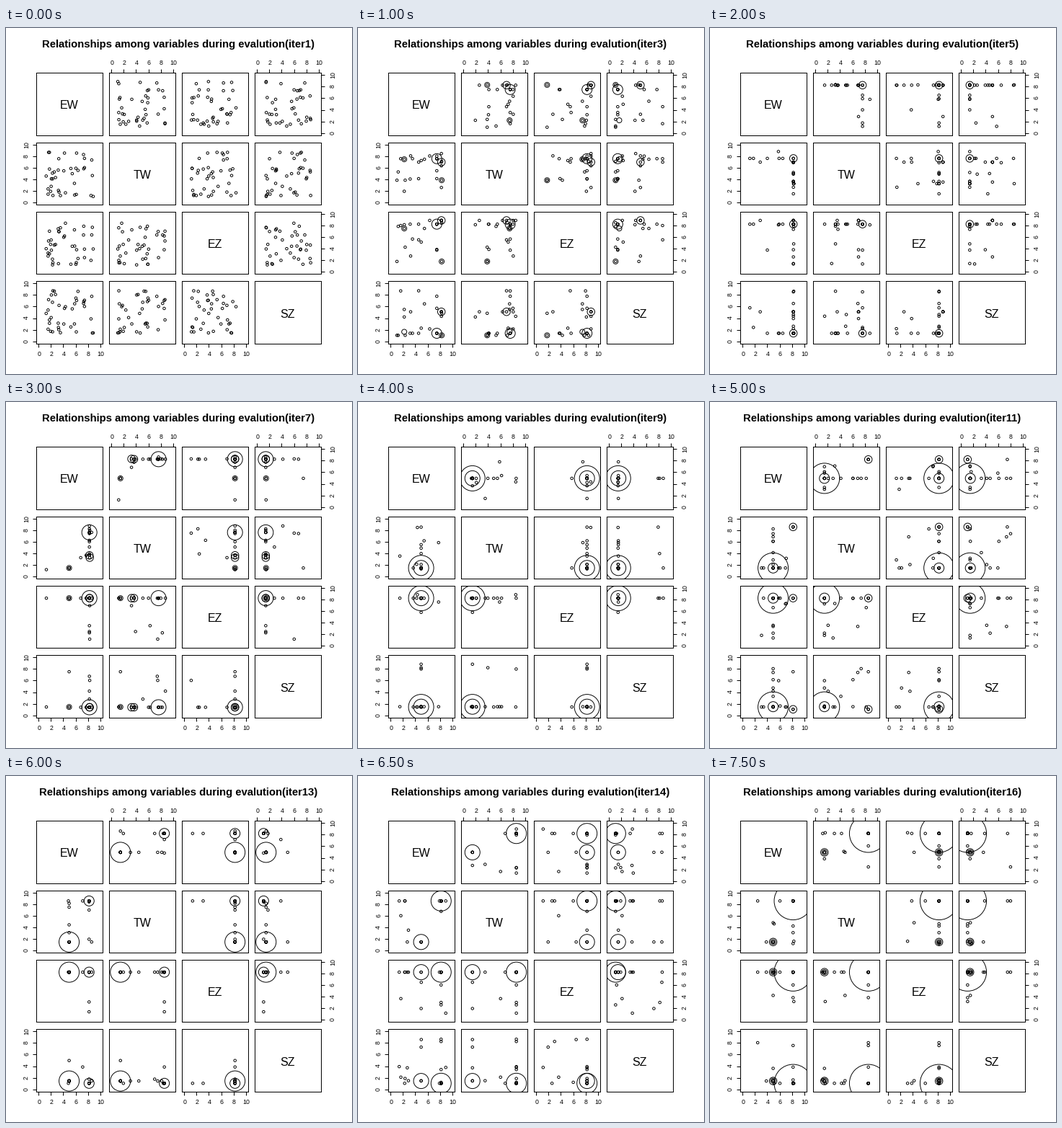
These frames come from a looping animation (480x480 px, 8000 ms). A matplotlib script:

```python
import matplotlib.pyplot as plt
import numpy as np
from matplotlib.animation import FuncAnimation

SIZE = 480
ITERATIONS = 16
NAMES = ["EW", "TW", "EZ", "SZ"]
LEFT = [42, 143, 244, 345]
TOP = [61, 158, 254, 350]
BOTTOM = [148, 244, 340, 437]
WIDTH = 92
LOW, HIGH = -0.4, 10.4
TICKS = range(0, 11, 2)
DOT = 3.5  # diameter of a single individual, in pixels

plt.rcParams["font.family"] = "Liberation Sans"

# Dominant individuals: their genes, and how many copies live at key iterations
LEADERS = [
    ((7.5, 7.6, 8.25, 1.4), {1: 0, 3: 4, 5: 0}),
    ((8.25, 7.0, 8.9, 5.1), {1: 0, 3: 3, 6: 0}),
    ((8.3, 3.85, 1.75, 1.05), {1: 0, 3: 2, 5: 0}),
    ((2.2, 7.5, 7.5, 1.65), {1: 0, 3: 2, 5: 0}),
    ((8.25, 7.65, 8.25, 1.4), {3: 0, 7: 6, 9: 0}),
    ((8.25, 3.65, 8.25, 1.4), {4: 0, 7: 3, 9: 0}),
    ((8.3, 3.25, 8.25, 1.4), {4: 0, 7: 3, 9: 0}),
    ((4.95, 1.45, 8.25, 1.45), {6: 0, 7: 2, 9: 10, 11: 12, 13: 8, 16: 3}),
    ((4.95, 1.45, 8.25, 1.5), {8: 0, 9: 6, 11: 4, 13: 1, 16: 2}),
    ((8.2, 8.6, 8.25, 1.05), {9: 0, 11: 3, 13: 4, 16: 15}),
]


def population(it):
    """Genes and copy counts: the leaders of this iteration plus mutants."""
    rng = np.random.default_rng(it)
    genes = np.array([g for g, _ in LEADERS])
    counts = np.array([np.interp(it, list(k), list(k.values()))
                       for _, k in LEADERS]).round()
    alive = counts > 0

    n = int(np.interp(it, [1, 3, 7], [38, 26, 22]))
    rate = np.interp(it, [1, 3, 7], [1, 0.5, 0.28])
    weights = counts + 1e-6
    parents = rng.choice(len(genes), n, p=weights / weights.sum())
    mutated = rng.random((n, 4)) < rate
    mutants = np.where(mutated, rng.uniform(1, 9, (n, 4)), genes[parents])
    return (np.vstack([genes[alive], mutants]),
            np.concatenate([counts[alive], np.ones(n)]))


generations = [population(it) for it in range(1, ITERATIONS + 1)]

fig = plt.figure(figsize=(SIZE / 72, SIZE / 72), dpi=72, facecolor="white")


def text(x, y, s, size, **kw):
    return fig.text(x / SIZE, 1 - y / SIZE, s, fontsize=size, ha="center",
                    va="baseline", rotation_mode="anchor", **kw)


def panel(row, col):
    x, y, h = LEFT[col], TOP[row], BOTTOM[row] - TOP[row]
    box = [x / SIZE, 1 - (y + h + 1) / SIZE, WIDTH / SIZE, h / SIZE]
    ax = fig.add_axes(box, facecolor="none")
    ax.set(xlim=(LOW, HIGH), ylim=(LOW, HIGH), xticks=TICKS, yticks=TICKS)
    sides = {"top": row == 0 and col % 2 == 1,
             "bottom": row == 3 and col % 2 == 0,
             "left": col == 0 and row % 2 == 1,
             "right": col == 3 and row % 2 == 0}
    ax.tick_params(length=5, width=1, labelleft=False, labelbottom=False,
                   **sides)
    for spine in ax.spines.values():
        spine.set_linewidth(1)
    for t in TICKS:
        tx = x + 0.5 + WIDTH * (t - LOW) / (HIGH - LOW)
        ty = y + 0.5 + h * (HIGH - t) / (HIGH - LOW)
        if sides["top"]:
            text(tx, 51, t, 8.8)
        if sides["bottom"]:
            text(tx, 455, t, 8.8)
        if sides["left"]:
            text(31, ty, t, 8.8, rotation=90)
        if sides["right"]:
            text(456, ty, t, 8.8, rotation=90)
    if row == col:
        text(x + WIDTH / 2, y + h / 2 + 8, NAMES[row], 16)
        return None
    return ax.scatter([], [], facecolors="none", edgecolors="black",
                      linewidths=0.95)


clouds = {(r, c): panel(r, c) for r in range(4) for c in range(4)}
title = text(239, 27, "", 14.85, weight="bold")


def draw(i):
    genes, counts = generations[i]
    for (r, c), cloud in clouds.items():
        if cloud is not None:
            cloud.set_offsets(genes[:, [c, r]])
            cloud.set_sizes((DOT * counts) ** 2)
    title.set_text(f"Relationships among variables during evalution(iter{i + 1})")


anim = FuncAnimation(fig, draw, frames=ITERATIONS, interval=500,
                     repeat=True, repeat_delay=0)
plt.show()
```
